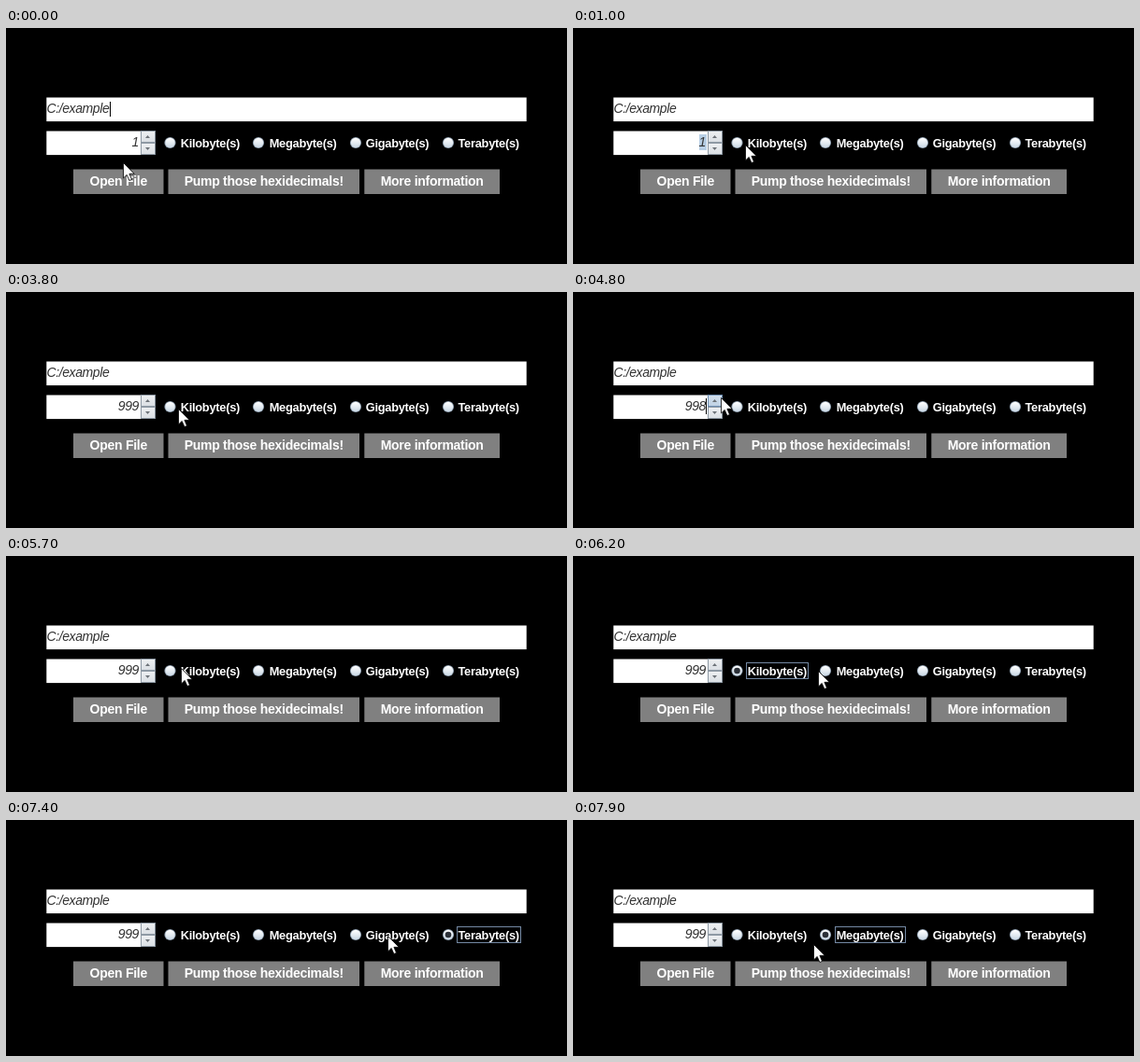
These frames come from a looping animation (600 by 253 pixels, 8 s). An HTML page with a canvas:

```html
<!DOCTYPE html>
<html lang="en">
<head>
<meta charset="utf-8">
<title>File pumper form</title>
<style>
  html, body { margin: 0; width: 100%; height: 100%; overflow: hidden; background: #000; }
  canvas { display: block; width: 600px; height: 253px; }
</style>
</head>
<body>
<canvas id="stage" width="600" height="253"></canvas>
<script>
const ctx = document.getElementById('stage').getContext('2d');
const LOOP = 8000, STEP = 100, BLINK = 500;
const FAMILY = '"Liberation Sans", Arial, sans-serif';
const INPUT = { font: `italic 14px ${FAMILY}`, spacing: '-0.4px', color: '#333' };
const LABEL = { font: `bold 12.8px ${FAMILY}`, spacing: '-0.25px', color: '#fff' };
const BUTTON = { font: `bold 14px ${FAMILY}`, spacing: '-0.27px', color: '#fff' };

// Pointer moves: start, end, x, y; it rests in between
const home = { x: 125, y: 144 };
const moves = [
  [0, 200, 130, 122], [300, 700, 195, 124], [700, 800, 184, 125],
  [4000, 4300, 466, 143], [4300, 4600, 151, 128], [4700, 4800, 158, 113],
  [5100, 5700, 187, 120], [5700, 5900, 176, 122], [6000, 6500, 391, 124],
  [6600, 6800, 468, 121], [7200, 7900, 257, 133]
];
const edits = [1500, 1800, 3300, 4600, 4900];
const clicks = [5900, 6300, 6600, 7000, 7700];
const radios = [
  { cx: 175.5, x: 186.7, label: 'Kilobyte(s)' },
  { cx: 270, x: 281.7, label: 'Megabyte(s)' },
  { cx: 374, x: 384.7, label: 'Gigabyte(s)' },
  { cx: 473, x: 483.5, label: 'Terabyte(s)' }
];
const buttons = [
  { x: 72, w: 96.5, label: 'Open File' },
  { x: 173.5, w: 204.5, label: 'Pump those hexidecimals!' },
  { x: 383.3, w: 144.7, label: 'More information' }
];

const lastBefore = (times, t) => times.filter(time => time <= t).pop();
const typed = (word, t, start) => word.slice(0, Math.floor((t - start) / STEP));

function pointerAt(t) {
  let { x, y } = home;
  for (const [from, to, nx, ny] of moves) {
    const k = Math.min(1, Math.max(0, (t - from) / (to - from)));
    x += (nx - x) * k;
    y += (ny - y) * k;
  }
  return { x: Math.round(x), y: Math.round(y) };
}

function valueAt(t) {
  if (t < 1500) return '1';
  if (t < 3000) return typed('500', t, 1500);
  if (t < 4600) return typed('999', t, 3000);
  return t < 4900 ? '998' : '999';
}

function caretOn(t) {
  return t >= edits[0] && t < clicks[0] &&
    (t - lastBefore(edits, t)) % (2 * BLINK) < BLINK;
}

// The radio that was under the pointer at the latest click
function choiceAt(t) {
  const click = lastBefore(clicks, t);
  if (click === undefined) return null;
  const { x } = pointerAt(click);
  return radios.filter(r => r.cx - 6 <= x).pop();
}

function rect(x, y, w, h, color) {
  ctx.fillStyle = color;
  ctx.fillRect(x, y, w, h);
}

function frame(x, y, w, h, color) {
  ctx.strokeStyle = color;
  ctx.lineWidth = 1;
  ctx.strokeRect(x + .5, y + .5, w - 1, h - 1);
}

function text(str, x, y, style, align = 'left') {
  ctx.font = style.font;
  ctx.letterSpacing = style.spacing;
  ctx.fillStyle = style.color;
  ctx.textAlign = align;
  ctx.fillText(str, x, y);
}

function polygon(points, color) {
  ctx.beginPath();
  points.forEach(([x, y]) => ctx.lineTo(x, y));
  ctx.closePath();
  ctx.fillStyle = color;
  ctx.fill();
}

function disc(cx, cy, r, color) {
  ctx.beginPath();
  ctx.arc(cx, cy, r, 0, Math.PI * 2);
  ctx.fillStyle = color;
  ctx.fill();
}

function shade(y, h, top, bottom) {
  const fill = ctx.createLinearGradient(0, y, 0, y + h);
  fill.addColorStop(0, top);
  fill.addColorStop(1, bottom);
  return fill;
}

function spinButton(y, dir, pointer) {
  const hover = pointer.x >= 144 && pointer.x < 160 && pointer.y >= y && pointer.y < y + 13;
  rect(144, y, 16, 13, hover ? shade(y, 13, '#d3e0ed', '#bfd1e3') : shade(y, 13, '#eff1f3', '#d9dee3'));
  frame(144, y, 16, 13, hover ? '#6f8fb2' : '#8e99a4');
  const mid = y + 6.5;
  polygon([[149, mid + 1.5 * dir], [154, mid + 1.5 * dir], [151.5, mid - 1.5 * dir]], '#6c7278');
}

function radio({ cx, x, label }, selected) {
  const cy = 123;
  disc(cx, cy, 6.1, '#8c9cac');
  disc(cx, cy, 5.2, shade(cy - 5, 10, '#ffffff', '#cbd9e6'));
  text(label, x, 127.5, LABEL);
  if (selected) {
    disc(cx, cy, 3.3, '#2b3038');
    frame(Math.floor(x) - 1, 114, Math.round(ctx.measureText(label).width) + 4, 18, '#7489a4');
  }
}

function ibeam(x, y) {
  rect(x, y - 8, 1, 17, '#000');
  rect(x - 3, y - 9, 7, 1, '#000');
  rect(x - 3, y + 9, 7, 1, '#000');
}

function arrow(x, y) {
  ctx.save();
  ctx.translate(x + .5, y + .5);
  polygon([[0, 0], [0, 16.4], [3.7, 12.9], [6.4, 19], [9, 17.9], [6.4, 11.8], [11.7, 11.8]], '#fff');
  ctx.strokeStyle = '#000';
  ctx.lineWidth = .8;
  ctx.stroke();
  ctx.restore();
}

function draw(t) {
  const pointer = pointerAt(t);
  rect(0, 0, 600, 253, '#000');

  rect(43.3, 74.5, 513.4, 25.6, '#fff');
  text('C:/example', 43.5, 91, INPUT);
  if (t < BLINK) rect(111, 79, 1, 16, '#000');

  rect(43.3, 110.5, 101, 25.6, '#fff');
  if (t >= 1000 && t < edits[0]) rect(135, 114, 8, 17, '#b8cfe5');
  text(valueAt(t), 142, 127, INPUT, 'right');
  if (caretOn(t)) rect(142, 114, 1, 17, '#000');
  spinButton(110, 1, pointer);
  spinButton(123, -1, pointer);

  const choice = choiceAt(t);
  radios.forEach(r => radio(r, r === choice));

  buttons.forEach(({ x, w, label }) => {
    rect(x, 151.5, w, 26.5, '#808080');
    text(label, x + w / 2, 169, BUTTON, 'center');
  });

  const inField = pointer.x > 43 && pointer.x < 144 && pointer.y > 110 && pointer.y < 136;
  (inField ? ibeam : arrow)(pointer.x, pointer.y);
}

const start = performance.now();
function tick() {
  const t = (performance.now() - start) % LOOP;
  draw(Math.floor(t / STEP) * STEP);
  requestAnimationFrame(tick);
}
tick();
</script>
</body>
</html>
```
